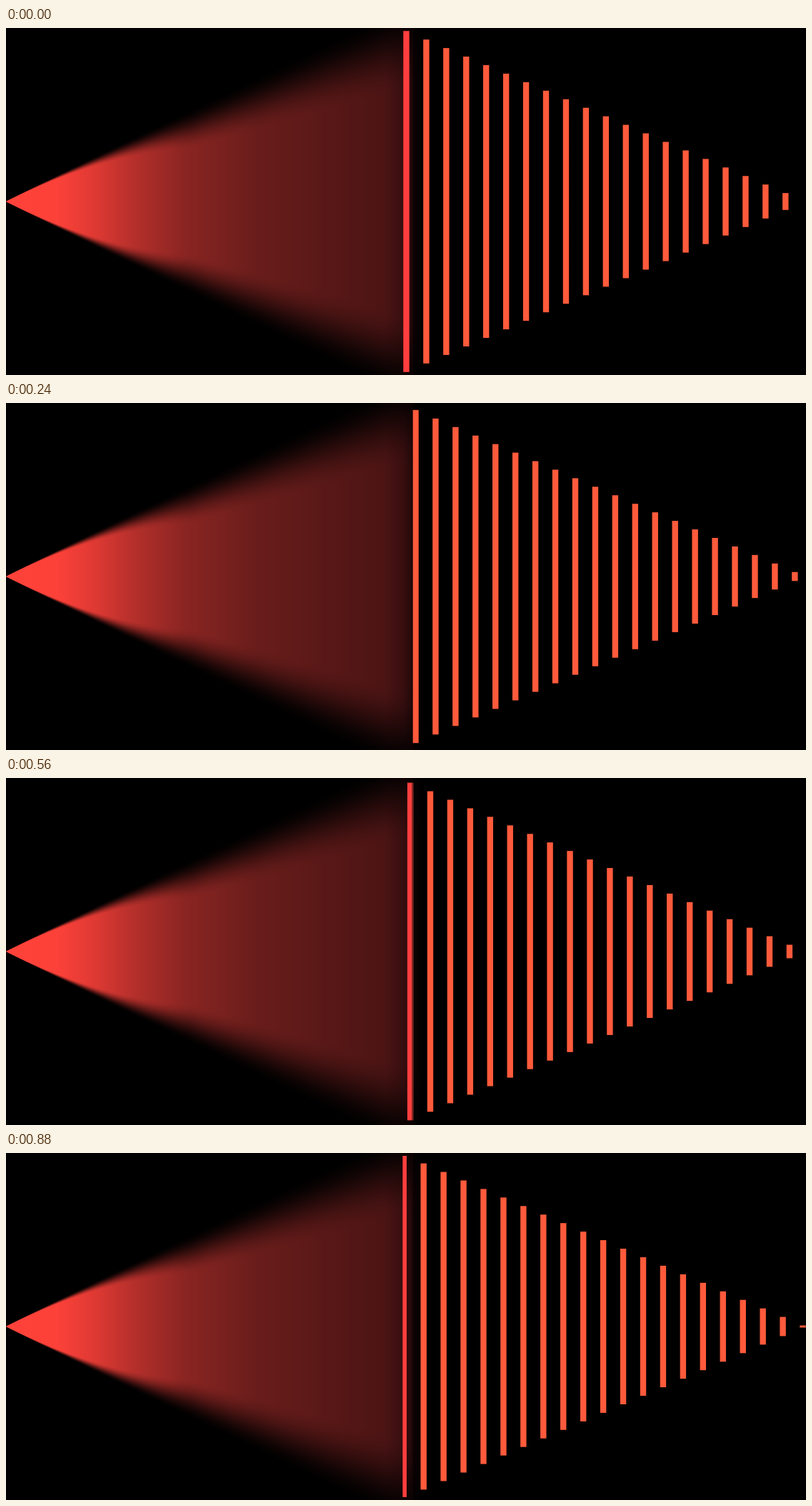
Write an HTML page with a canvas that moves like this. It is 1120 by 486 pixels and loops after 920 ms.

```html
<!DOCTYPE html>
<html lang="en">
<head>
<meta charset="utf-8">
<title>Light cone</title>
<style>
  html, body { margin: 0; width: 100%; height: 100%; overflow: hidden; background: #000; }
  canvas { display: block; width: 1120px; height: 486px; }
</style>
</head>
<body>
<canvas id="stage" width="1120" height="486"></canvas>
<script>
const W = 1120, H = 486, MID = 243;
const LOOP = 920, FRAME = 40, FRAMES = 23, STEPS = 30;
const PITCH = 27.94, BAR = 8.4, SLOPE = 0.4275, TIP = 1119;
const GATE = 555.3, SEAM = 569;

// Colour along the axis of the cone: x, r, g, b
const TONES = [
  [0, 255, 66, 58], [70, 252, 65, 57], [125, 222, 57, 51], [180, 180, 47, 43],
  [250, 138, 37, 34], [350, 105, 29, 27], [450, 88, 24, 23], [530, 76, 20, 20],
  [556, 56, 14, 15], [SEAM, 34, 8, 9], [570, 14, 3, 4], [584, 0, 0, 0]
];

function tone(x) {
  const i = TONES.findIndex(t => t[0] > x);
  const a = TONES[i - 1], b = TONES[i];
  const u = (x - a[0]) / (b[0] - a[0]);
  return a.slice(1).map((c, j) => c + (b[j + 1] - c) * u);
}

function makeCone() {
  const cone = document.createElement("canvas");
  cone.width = 584;
  cone.height = H;
  const g = cone.getContext("2d");
  const img = g.createImageData(cone.width, H);
  for (let x = 0; x < cone.width; x++) {
    const color = tone(x);
    const outer = 0.5 * x + 1;
    const soft = 1 + x * 0.22 * Math.min(1, x / 260);
    for (let y = 0; y < H; y++) {
      const u = Math.max(0, Math.min(1, (outer - Math.abs(y + 0.5 - MID)) / soft));
      const f = u * u * (3 - 2 * u);
      img.data.set([...color.map(c => c * f), 255], (y * cone.width + x) * 4);
    }
  }
  g.putImageData(img, 0, 0);
  return cone;
}

const ctx = document.getElementById("stage").getContext("2d");
const cone = makeCone();
const paint = ctx.createLinearGradient(GATE, 0, SEAM, 0);
paint.addColorStop(0, "#ff3d3e");
paint.addColorStop(1, "#ff403e");
paint.addColorStop(1, "#ff5a3b");

function draw(time) {
  const frame = Math.floor((time % LOOP) / FRAME);
  const step = Math.floor(frame * STEPS / FRAMES);
  const shift = (step % 15) / 15 * PITCH;

  ctx.fillStyle = "#000";
  ctx.fillRect(0, 0, W, H);
  ctx.drawImage(cone, 0, 0);

  ctx.save();
  ctx.beginPath();
  ctx.rect(GATE, 4, W - GATE, 478);
  ctx.clip();
  ctx.fillStyle = paint;
  for (let x = 528.3 + shift; x < W; x += PITCH) {
    const half = (TIP - x - BAR / 2) * SLOPE;
    if (half > 0) ctx.fillRect(x, MID - half, BAR, half * 2);
  }
  ctx.restore();

  ctx.fillStyle = "#100304";
  ctx.fillRect(SEAM - 0.5, 0, 1, H);
}

function tick() {
  draw(performance.now());
  requestAnimationFrame(tick);
}
tick();
</script>
</body>
</html>
```
